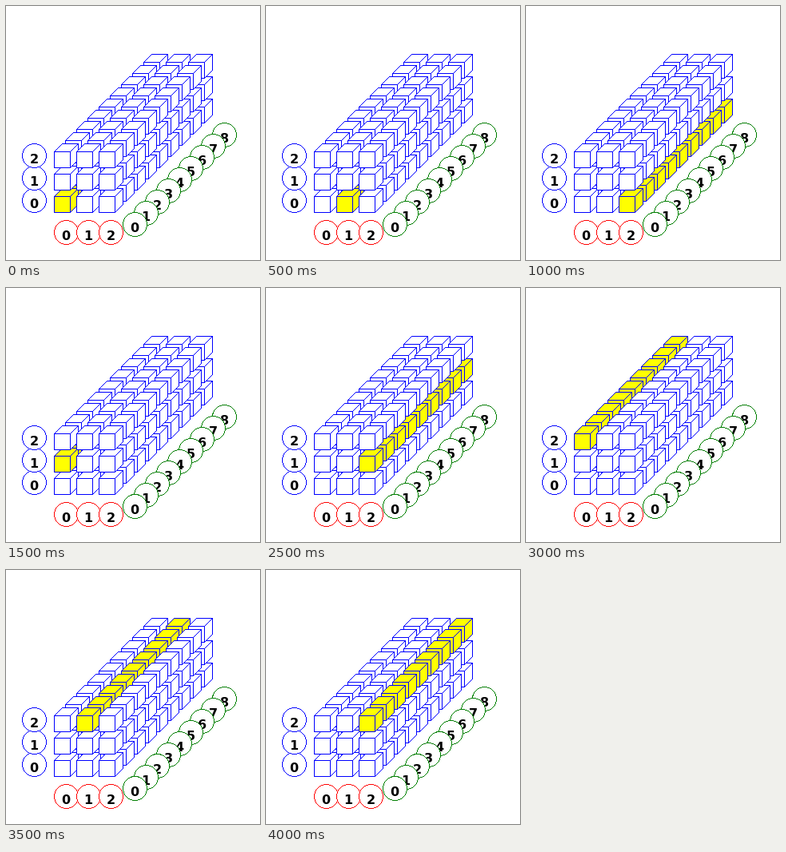
Recreate the animation shown at these times as an HTML page. Size 318x318 px, loop 4.5 s.

```html
<!DOCTYPE html>
<html lang="en">
<head>
<meta charset="utf-8">
<title>Stepping through a 3 × 3 × 9 array</title>
<style>
  html, body { margin: 0; width: 100%; height: 100%; overflow: hidden; background: #fff; }
  svg { display: block; }
  path, circle { fill: #fff; stroke-linejoin: round; shape-rendering: crispEdges; }
  path { stroke: blue; }
  path.active { fill: #ff0; }
  text { font: bold 16px "DejaVu Sans", sans-serif; text-anchor: middle; }
</style>
</head>
<body>
<svg width="318" height="318"><g id="scene" transform="translate(.5 .5)"></g></svg>
<script>
const COLS = 3, ROWS = 3, DEPTH = 9;
const PITCH = 28, DEPTH_PITCH = 14, STEP_MS = 500;
const CUBE = 'M0 0l10-10h20v20l-10 10h-20zM0 0h20v20M20 0l10-10';
const scene = document.getElementById('scene');

function add(tag, attributes, content = '') {
  const node = document.createElementNS('http://www.w3.org/2000/svg', tag);
  for (const name in attributes) node.setAttribute(name, attributes[name]);
  node.textContent = content;
  scene.append(node);
  return node;
}

function label(x, y, color, number) {
  add('circle', { cx: x, cy: y, r: 15, stroke: color });
  add('text', { x, y: y + 9 }, number);
}

// Paint from back to front; group the cubes that light up together.
const lines = Array.from({ length: COLS * ROWS }, () => []);
for (let z = DEPTH - 1; z >= 0; z--) {
  for (let row = 0; row < ROWS; row++) {
    for (let col = 0; col < COLS; col++) {
      const x = 60 + col * PITCH + z * DEPTH_PITCH;
      const y = 238 - row * PITCH - z * DEPTH_PITCH;
      lines[row * COLS + col].push(add('path', { d: CUBE, transform: `translate(${x} ${y})` }));
    }
  }
}

for (let i = 0; i < ROWS; i++) label(35, 243 - i * PITCH, 'blue', i);
for (let i = 0; i < COLS; i++) label(75 + i * PITCH, 283, 'red', i);
for (let i = DEPTH - 1; i >= 0; i--) {
  label(161 + i * DEPTH_PITCH, 273 - i * DEPTH_PITCH, 'green', i);
}

const start = performance.now();
function draw(now) {
  const active = Math.floor(Math.max(0, now - start) / STEP_MS) % lines.length;
  lines.forEach((cubes, i) => {
    for (const cube of cubes) cube.classList.toggle('active', i === active);
  });
  requestAnimationFrame(draw);
}
draw(start);
</script>
</body>
</html>
```
